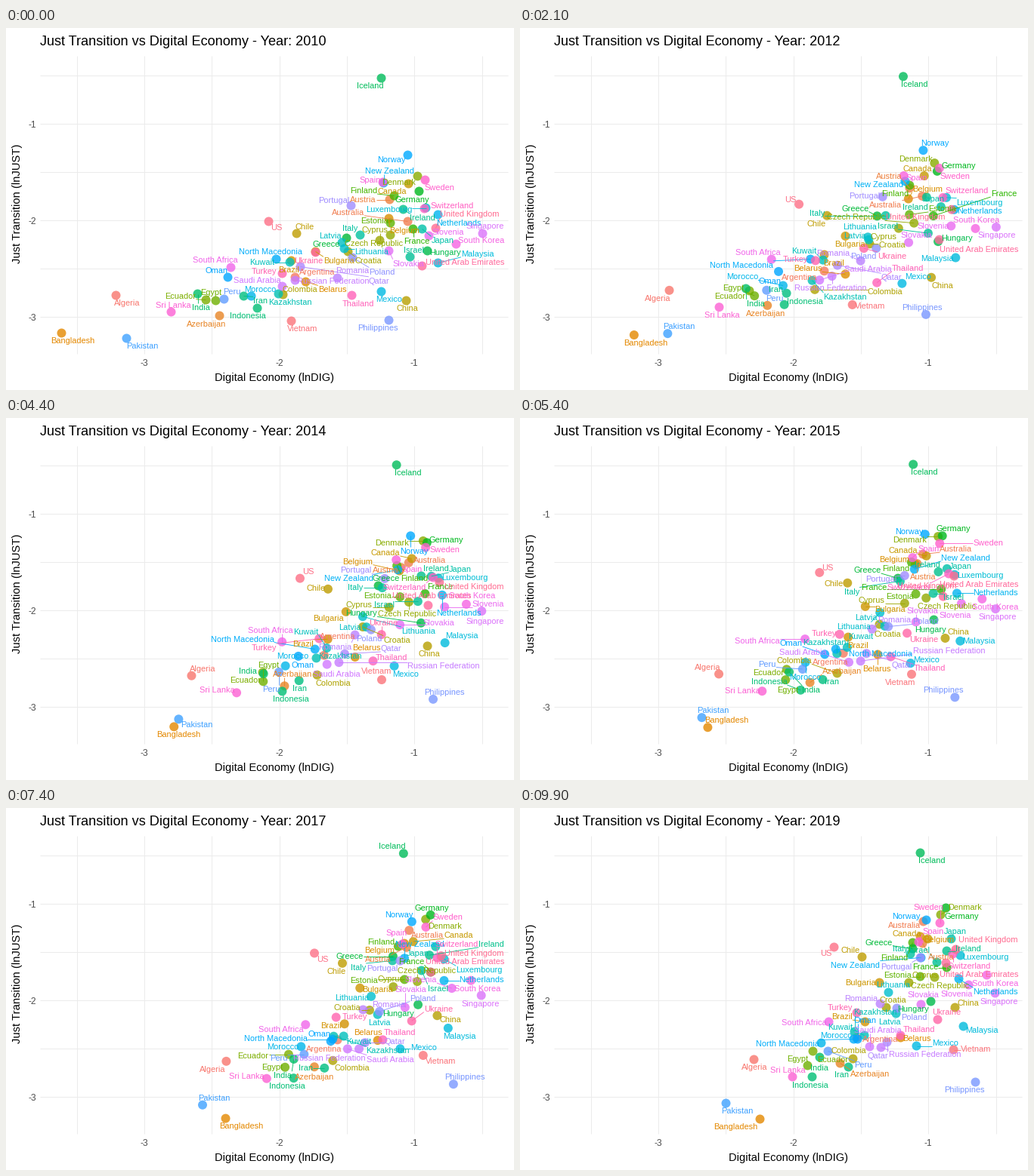
Animation, 672 px wide and 480 px high, one loop 10000 ms. Source, as a matplotlib script:

```python
import numpy as np
import matplotlib.pyplot as plt
from matplotlib.animation import FuncAnimation
from matplotlib.collections import LineCollection

W, H, DPI = 672, 480, 96
FRAMES, STEPS_PER_YEAR = 100, 11
PX = 72 / DPI  # points per pixel
LEFT, TOP, RIGHT, BOTTOM = 45, 37, 664, 432

plt.rcParams["font.family"] = "Liberation Sans"
names, starts, ends = [], [], []


def country(name, start, end):
    names.append(name)
    starts.append(start)
    ends.append(end)


country("Algeria", (145, 354), (309, 333))
country("Argentina", (382, 330), (445, 304))
country("Australia", (531, 256), (533, 150))
country("Austria", (507, 227), (532, 179))
country("Azerbaijan", (282, 381), (423, 338))
country("Bangladesh", (73, 404), (317, 412))
country("Belarus", (396, 336), (503, 304))
country("Belgium", (506, 252), (529, 170))
country("Brazil", (377, 308), (456, 283))
country("Bulgaria", (409, 296), (475, 231))
country("Canada", (532, 206), (539, 173))
country("Chile", (384, 272), (452, 197))
country("China", (529, 361), (575, 264))
country("Colombia", (366, 353), (440, 332))
country("Croatia", (452, 296), (484, 264))
country("Cyprus", (494, 281), (514, 231))
country("Czech Republic", (508, 274), (548, 224))
country("Denmark", (544, 196), (556, 141))
country("Ecuador", (264, 360), (387, 322))
country("Egypt", (277, 361), (380, 341))
country("Estonia", (508, 258), (529, 223))
country("Finland", (513, 222), (519, 178))
country("France", (538, 266), (564, 211))
country("Germany", (546, 216), (563, 132))
country("Greece", (450, 278), (519, 186))
country("Hungary", (557, 295), (543, 256))
country("Iceland", (496, 66), (529, 59))
country("India", (253, 352), (396, 330))
country("Indonesia", (332, 371), (386, 356))
country("Iran", (314, 355), (434, 343))
country("Ireland", (525, 240), (564, 189))
country("Israel", (534, 303), (551, 204))
country("Italy", (468, 274), (516, 193))
country("Japan", (550, 266), (570, 173))
country("Kazakhstan", (360, 352), (442, 296))
country("Kuwait", (375, 310), (455, 301))
country("Latvia", (444, 284), (497, 272))
country("Lithuania", (447, 292), (487, 244))
country("Luxembourg", (555, 238), (582, 195))
country("Malaysia", (571, 311), (586, 289))
country("Mexico", (496, 349), (524, 315))
country("Morocco", (324, 355), (398, 311))
country("Netherlands", (571, 247), (580, 226))
country("New Zealand", (499, 205), (530, 198))
country("North Macedonia", (357, 306), (441, 306))
country("Norway", (531, 168), (537, 148))
country("Oman", (293, 330), (446, 306))
country("Pakistan", (159, 411), (272, 391))
country("Peru", (288, 359), (407, 322))
country("Philippines", (506, 387), (602, 363))
country("Poland", (458, 304), (498, 265))
country("Portugal", (456, 235), (529, 198))
country("Qatar", (389, 316), (485, 310))
country("Romania", (438, 331), (476, 259))
country("Russian Federation", (382, 334), (477, 317))
country("Saudi Arabia", (365, 342), (462, 316))
country("Singapore", (630, 272), (628, 245))
country("Slovakia", (506, 295), (530, 260))
country("Slovenia", (559, 275), (593, 234))
country("South Africa", (297, 317), (408, 283))
country("South Korea", (595, 286), (617, 221))
country("Spain", (498, 204), (527, 177))
country("Sri Lanka", (218, 376), (360, 356))
country("Sweden", (554, 201), (555, 152))
country("Switzerland", (553, 239), (572, 193))
country("Thailand", (457, 354), (503, 301))
country("Turkey", (365, 325), (445, 271))
country("Ukraine", (409, 297), (552, 280))
country("United Arab Emirates", (550, 315), (563, 205))
country("United Kingdom", (568, 265), (576, 187))
country("US", (347, 256), (415, 184))
country("Vietnam", (377, 388), (573, 320))

N = len(names)
starts, ends = np.array(starts) + 0.5, np.array(ends) + 0.5


def hcl(hue, chroma=100, light=65):
    """Polar LUV colour as sRGB."""
    a = np.radians(hue)
    u = chroma * np.cos(a) / (13 * light) + 0.1978
    v = chroma * np.sin(a) / (13 * light) + 0.4683
    y = ((light + 16) / 116) ** 3
    xyz = np.array([y * 9 * u / (4 * v), y, y * (12 - 3 * u - 20 * v) / (4 * v)])
    rgb = np.clip([[3.2405, -1.5371, -0.4985],
                   [-0.9693, 1.8760, 0.0416],
                   [0.0556, -0.2040, 1.0572]] @ xyz, 0, 1)
    return np.where(rgb > 0.0031308, 1.055 * rgb ** (1 / 2.4) - 0.055, 12.92 * rgb)


colors = np.array([hcl(15 + 360 * i / N) for i in range(N)])

fig = plt.figure(figsize=(W / DPI, H / DPI), dpi=DPI, facecolor="white")
ax = fig.add_axes([0, 0, 1, 1])
ax.set(xlim=(0, W), ylim=(H, 0))
ax.axis("off")


def write(x, y, s, size, **kw):
    return ax.text(x, y, s, fontsize=size * PX, va="baseline", **kw)


grid = dict(color="#EBEBEB", lw=PX, zorder=0)
ax.vlines(np.round(719 - 178.6 * np.arange(0.5, 4, 0.5)), TOP, BOTTOM, **grid)
ax.hlines(np.arange(63, BOTTOM, 64), LEFT, RIGHT, **grid)
for k in (1, 2, 3):
    write(719 - 178.7 * k, 448, f"-{k}", 12, ha="center", color="#4D4D4D")
    write(40, 4 + 128 * k, f"-{k}", 12, ha="right", color="#4D4D4D")
write(355, 468, "Digital Economy (lnDIG)", 14.6, ha="center")
write(19, 233, "Just Transition (lnJUST)", 14.7, ha="center",
      rotation=90, rotation_mode="anchor")
title = write(LEFT, 23, "", 18.1)

marks = ax.scatter(*starts.T, s=(12 * PX) ** 2, c=colors, alpha=0.8, lw=0, zorder=1)
leaders = ax.add_collection(LineCollection([], lw=0.65, zorder=2))
labels = [write(0, 0, n, 11, ha="center", color=c, zorder=3)
          for n, c in zip(names, colors)]
half = np.array([[t.get_window_extent().width / 2, 5] for t in labels])


def push(a, b, reach, weight):
    """Push each a away from every b it overlaps; also tell which a were hit."""
    d = a[:, None] - b
    hit = (np.abs(d) < reach).all(axis=2) * weight
    force = d * (hit / (np.hypot(d[..., 0], d[..., 1]) + 1e-6))[..., None]
    return force.sum(axis=1), hit.any(axis=1)


own = np.eye(N)
between_labels = half[:, None] + half + (1, 1.5)
around_dot = half[:, None] + (3, 5)
low = half + (LEFT + 5, TOP + 5)
high = (RIGHT - 5, BOTTOM - 5) - half


def place(pos, rng, rounds=160):
    """Start on a random diagonal, repel overlaps, pull free labels back."""
    c = pos + rng.choice([-1, 1], (N, 2)) * (16, 10.5)
    for step in np.linspace(2, 0.2, rounds):
        f1, hit1 = push(c, c, between_labels, 1 - own)
        f2, hit2 = push(c, pos, around_dot, 0.25 + 0.75 * own)
        free = ~(hit1 | hit2)
        c = c + np.clip(step * (f1 + f2), -6, 6)
        c = c - 0.03 * free[:, None] * (c - pos)
        c = np.clip(c, low, high)
    return c


def update(i):
    year = round(2010 + i / STEPS_PER_YEAR)
    title.set_text(f"Just Transition vs Digital Economy - Year: {year}")
    ease = 1 - (1 - i / (FRAMES - 1)) ** 1.6
    pos = starts + (ends - starts) * ease
    centre = place(pos, np.random.default_rng(i))
    marks.set_offsets(pos)
    for text, (x, y) in zip(labels, centre):
        text.set_position((x, y + 4))
    # leader from the nearest edge of the label box to the dot
    edge = np.clip(pos, centre - half, centre + half)
    far = np.hypot(*(edge - pos).T) > 9.6
    leaders.set_segments(np.stack([edge, pos], axis=1)[far])
    leaders.set_color(colors[far])
    return [title, marks, leaders, *labels]


anim = FuncAnimation(fig, update, frames=FRAMES, interval=100,
                     repeat=True, repeat_delay=0, blit=False)
plt.show()
```
